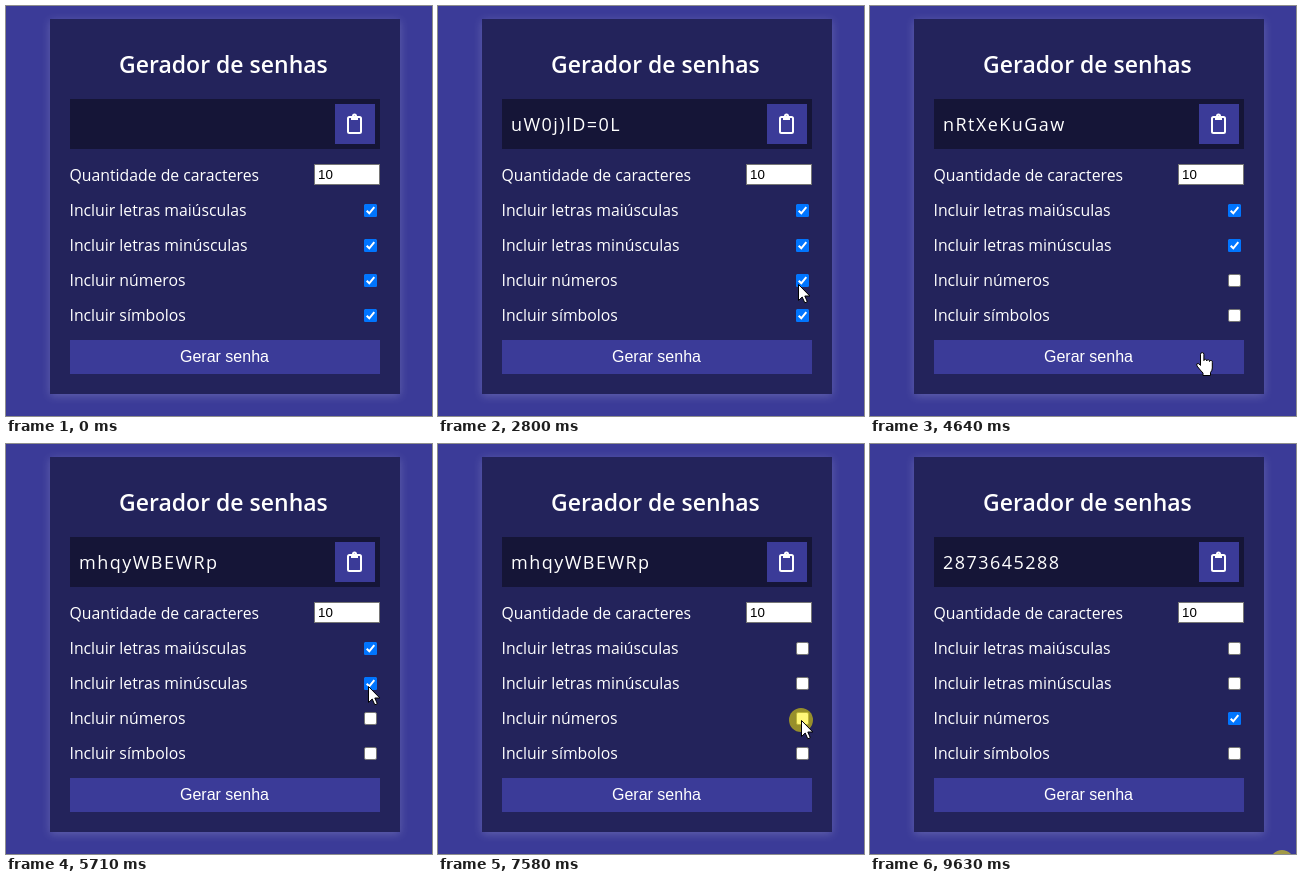
These frames come from a looping animation (426 by 410 pixels, 9.7 s). An HTML page:

```html
<!DOCTYPE html>
<html lang="pt-BR">
<head>
<meta charset="utf-8">
<title>Gerador de senhas</title>
<style>
  html, body { margin: 0; width: 100%; height: 100%; overflow: hidden; background: #3b3b98; }
  svg { display: block; width: 426px; height: 410px; }
  text { fill: #fff; font: 15.8px "Open Sans", sans-serif; white-space: pre; }
  .panel { fill: #23235b; filter: drop-shadow(0 2px 5px rgba(255, 255, 255, .2)); }
  .accent { fill: #3b3b98; }
  .title { font-size: 23px; font-weight: 600; }
  .password { font-size: 18px; letter-spacing: 1.45px; }
  .system { font: 16px "Liberation Sans", Arial, sans-serif; }
  .field { font-size: 13.333px; fill: #000; }
  .box { fill: #fff; stroke: #767676; }
  .tick rect { fill: #0075ff; }
  .tick path { fill: none; stroke: #fff; stroke-width: 2; }
  .pointer path { fill: #fff; stroke: #000; stroke-linejoin: round; }
</style>
</head>
<body>
<svg viewBox="0 0 426 410">
  <rect class="panel" x="44" y="13" width="350" height="375"/>
  <text class="title" x="113" y="67">Gerador de senhas</text>

  <rect x="64" y="93" width="310" height="50" fill="#151537"/>
  <text class="password" id="password" x="73" y="125"></text>
  <rect class="accent" x="329" y="98" width="40" height="40"/>
  <g fill="none" stroke="#fff" stroke-width="2">
    <rect x="342" y="111" width="13" height="16" rx="1.5"/>
    <path d="M345 112h7" stroke-width="4"/>
    <circle cx="348.5" cy="110" r="1.5"/>
  </g>

  <text x="63.5" y="175">Quantidade de caracteres</text>
  <rect class="box" x="308.5" y="158.5" width="65" height="20"/>
  <text class="system field" x="312" y="173">10</text>
  <g id="options"></g>

  <rect class="accent" x="64" y="334" width="310" height="34"/>
  <text class="system" x="174" y="356">Gerar senha</text>

  <circle id="halo" r="12" fill="#fff000" fill-opacity=".53"/>
  <g class="pointer" id="pointer">
    <path id="arrow" d="M.5 .5V16.5L4.2 13L6.8 18.8L9.3 17.7L6.8 12H11.8Z"/>
    <path id="hand" transform="translate(-5 0)" d="M4.5 2.3a1.7 1.7 0 0 1 3.4 0V8.6a1.4 1.4 0 0 1 2.8 .3a1.4 1.4 0 0 1 2.8 .6a1.4 1.4 0 0 1 2.8 .9V16q0 2.5-1.8 4.5V23.5H7V21Q4.5 18.5 1 14q-1.2-2.6 1.2-2.6L4.5 13.4Z"/>
  </g>
</svg>
<script>
const LOOP = 9700;
const TICK = 75;          // the pointer is redrawn once per tick
const TRAVEL = 6 * TICK;  // longest time the pointer takes to reach a spot
const SLOW = 2 * TICK;    // hold time of an unhurried click

const labels = ["letras maiúsculas", "letras minúsculas", "números", "símbolos"];
const passwords = ["", "uP!6m)3gOU", "k7R@vQ2x(M", "uW0j)lD=0L", "nRtXeKuGaw",
                   "mhqyWBEWRp", "4505427265", "2873645288"];

const entry = { x: 520, y: 400 };
const exit = { x: 412, y: 418 };
const buttonMiddle = { x: 288, y: 347, generates: true };
const buttonRight = { x: 331, y: 346, generates: true };
const [upper, lower, digits, symbols] = labels.map((_, i) => ({ x: 363, y: 204 + 36 * i }));
const options = [upper, lower, digits, symbols];

// The pointer leaves one tick after the last release unless told otherwise.
const clicks = [];
function click(spot, press, { leave, hold = TICK } = {}) {
  const last = clicks.at(-1);
  leave ??= last.release + TICK;
  const arrive = Math.min(press - TICK, leave + TRAVEL);
  clicks.push({ spot, press, release: press + hold, leave, arrive });
}

click(buttonMiddle, 750, { leave: 130, hold: SLOW });
click(buttonMiddle, 1460, { hold: SLOW });
click(buttonMiddle, 2170);
click(digits, 3170, { leave: 2570 });
click(symbols, 4020, { leave: 3420 });
click(buttonRight, 4490, { hold: SLOW });
click(buttonRight, 5410);
click(lower, 5955, { leave: 5485 });
click(upper, 6570);
click(digits, 7510);
click(buttonRight, 8130, { leave: 7750 });
click(buttonRight, 8610, { hold: SLOW });
click(exit, 9630, { leave: 8910 });

const el = id => document.getElementById(id);
const show = (node, visible) => node.setAttribute("visibility", visible ? "visible" : "hidden");
const place = (node, { x, y }) => node.setAttribute("transform", `translate(${x} ${y})`);
const easeOut = p => 1 - (1 - p) ** 4;

el("options").innerHTML = labels.map((label, i) => `
  <g transform="translate(0 ${198 + 35 * i})">
    <text x="63.5" y="12">Incluir ${label}</text>
    <rect class="box" x="358.5" y=".5" width="12" height="12" rx="1.5"/>
    <g class="tick">
      <rect x="358" width="13" height="13" rx="1.5"/>
      <path d="M360.7 6.7L363.3 9.3L368.3 3.2"/>
    </g>
  </g>`).join("");
const ticks = document.querySelectorAll(".tick");

function pointerAt(time) {
  let { x, y } = entry;
  for (const { spot, leave, arrive } of clicks) {
    if (time < leave) break;
    const elapsed = (Math.floor((time - leave) / TICK) + 1) * TICK;
    const eased = easeOut(Math.min(1, elapsed / (arrive - leave + TICK)));
    x += (spot.x - x) * eased;
    y += (spot.y - y) * eased;
  }
  return { x: Math.round(x), y: Math.round(y) };
}

function render(time) {
  const pointer = pointerAt(time);
  const { x, y } = pointer;
  const onButton = x >= 64 && x < 374 && y >= 334 && y < 368;
  place(el("pointer"), pointer);
  place(el("halo"), pointer);
  show(el("arrow"), time >= clicks[0].leave && !onButton);
  show(el("hand"), onButton);
  show(el("halo"), clicks.some(c => time >= c.press && time < c.release));

  const done = clicks.filter(c => time >= c.release);
  el("password").textContent = passwords[done.filter(c => c.spot.generates).length];
  options.forEach((option, i) =>
    show(ticks[i], done.filter(c => c.spot === option).length % 2 === 0));
}

const origin = performance.now();
function frame() {
  render((performance.now() - origin) % LOOP);
  requestAnimationFrame(frame);
}
frame();
</script>
</body>
</html>
```
